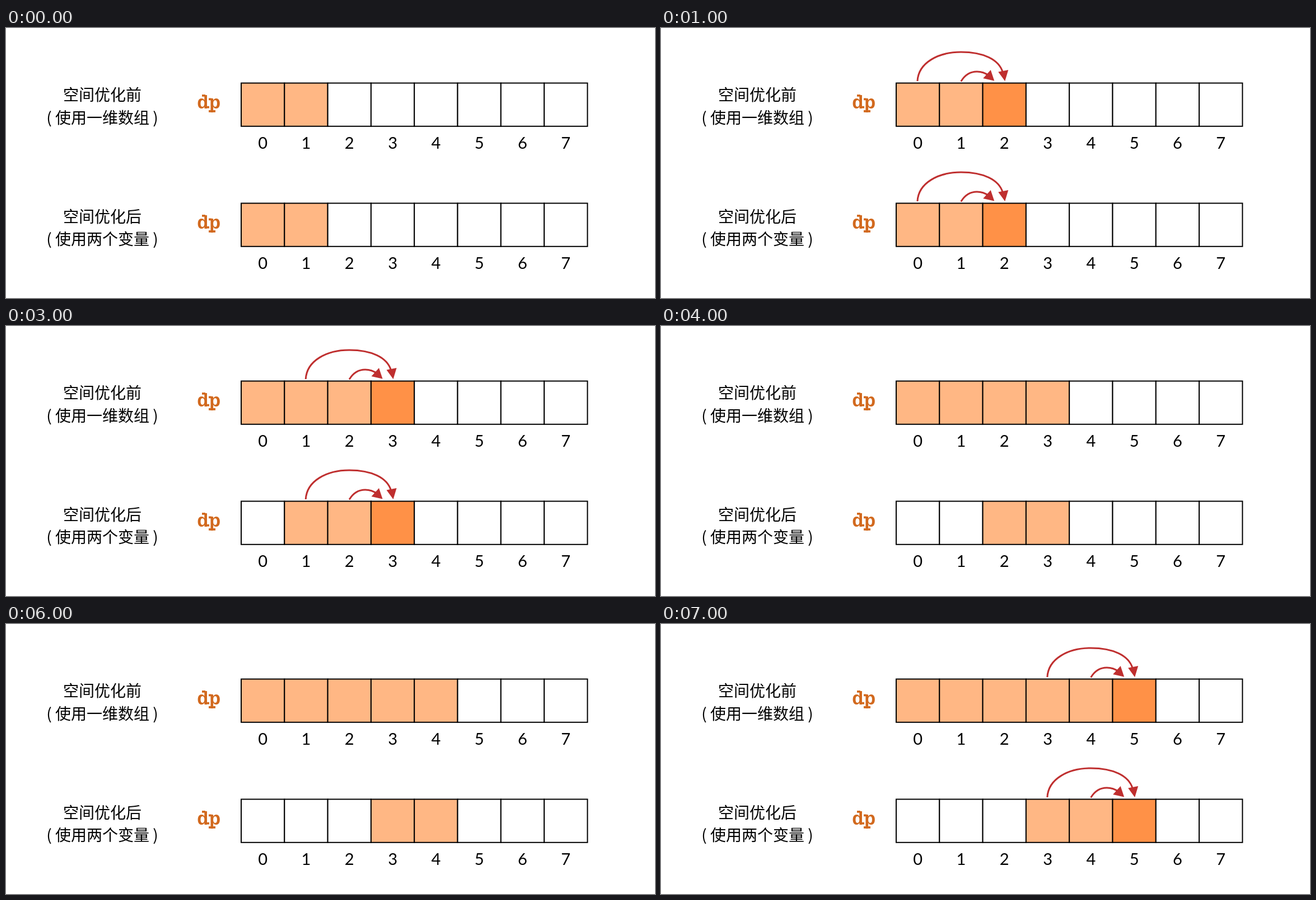
These frames come from a looping animation (1159x483 px, 8 s). An HTML page:

```html
<!DOCTYPE html>
<html lang="zh-CN">
<head>
<meta charset="utf-8">
<style>
html, body { margin: 0; width: 100%; height: 100%; overflow: hidden; background: #fff; }
svg { display: block; width: 100%; height: 100%; }
text { text-anchor: middle; }
.label { font: 28px "Noto Sans CJK SC", "Noto Sans CJK", sans-serif; }
.index { font: 29px Lato, sans-serif; }
.name { font: bold 34px "Liberation Mono", monospace; letter-spacing: 1.6px; text-anchor: start; }
.dp { fill: #d2691e; }
.cell { stroke: #000; stroke-width: 2; }
.curve { fill: none; stroke: #bf2f2f; stroke-width: 3; }
.head { fill: #bf2f2f; }
</style>
</head>
<body>
<svg id="stage" viewBox="0 0 1159 483"></svg>
<script>
const LEFT = 420, TOP = 98.5, SIZE = 77.3, COUNT = 8, STEP = 1000, STEPS = 8;
const EMPTY = '#fff', KNOWN = '#ffb784', FRESH = '#ff9147';
const stage = document.getElementById('stage');

function add(parent, tag, attrs, text) {
  const el = document.createElementNS('http://www.w3.org/2000/svg', tag);
  for (const key in attrs) el.setAttribute(key, attrs[key]);
  if (text !== undefined) el.textContent = text;
  parent.append(el);
  return el;
}

function addName(g) {
  add(g, 'text', { class: 'name dp', x: 341, y: 143.5 }, 'dp');
  // slab serifs
  add(g, 'path', { class: 'dp', d: 'M350 119h6v3.7h-6zM358 139.8h5v3.7h-5zM362 125.5h5v3.7h-5zM362 147h12v3.7h-12z' });
}

// Both arrows, drawn relative to the middle of the cell they point to
function addArrows(g) {
  const arrows = add(g, 'g', {});
  add(arrows, 'path', { class: 'curve', d: 'M-155.3 95C-153.5 62-118 43-77.5 43C-38 43-10 56-3 79' });
  add(arrows, 'path', { class: 'head', d: 'M1 95L-11 78.5L7 75z' });
  add(arrows, 'path', { class: 'curve', d: 'M-77.5 95.5C-70 83-59 78-49 78C-41 78-34 80.5-28 85' });
  add(arrows, 'path', { class: 'head', d: 'M-18 94.5L-38 90L-24.5 75z' });
  return arrows;
}

function addRow(dy, labelDy, lines, keepAll) {
  lines.forEach((line, i) =>
    add(stage, 'text', { class: 'label', x: 172, y: 130 + labelDy + i * 40.5 }, line));
  const g = add(stage, 'g', { transform: `translate(0 ${dy})` });
  addName(g);
  const cells = [];
  for (let i = 0; i < COUNT; i++) {
    const x = LEFT + i * SIZE;
    cells.push(add(g, 'rect', { class: 'cell', x, y: TOP, width: SIZE, height: SIZE }));
    add(g, 'text', { class: 'index', x: x + SIZE / 2, y: 215.5 }, i);
  }
  return { cells, keepAll, arrows: addArrows(g) };
}

const rows = [
  addRow(0, 0, ['空间优化前', '( 使用一维数组 )'], true),
  addRow(215, 217.5, ['空间优化后', '( 使用两个变量 )'], false)
];

function draw(now) {
  const step = Math.floor(now / STEP) % STEPS;
  const next = 2 + Math.floor(step / 2);
  const active = step % 2 === 1;
  for (const { cells, keepAll, arrows } of rows) {
    const first = keepAll ? 0 : next - 2;
    cells.forEach((cell, i) => {
      const fill = active && i === next ? FRESH : i >= first && i < next ? KNOWN : EMPTY;
      cell.setAttribute('fill', fill);
    });
    arrows.setAttribute('transform', `translate(${LEFT + (next + 0.5) * SIZE} 0)`);
    arrows.setAttribute('visibility', active ? 'visible' : 'hidden');
  }
}

const start = performance.now();
function tick() {
  draw(performance.now() - start);
  requestAnimationFrame(tick);
}
tick();
</script>
</body>
</html>
```
